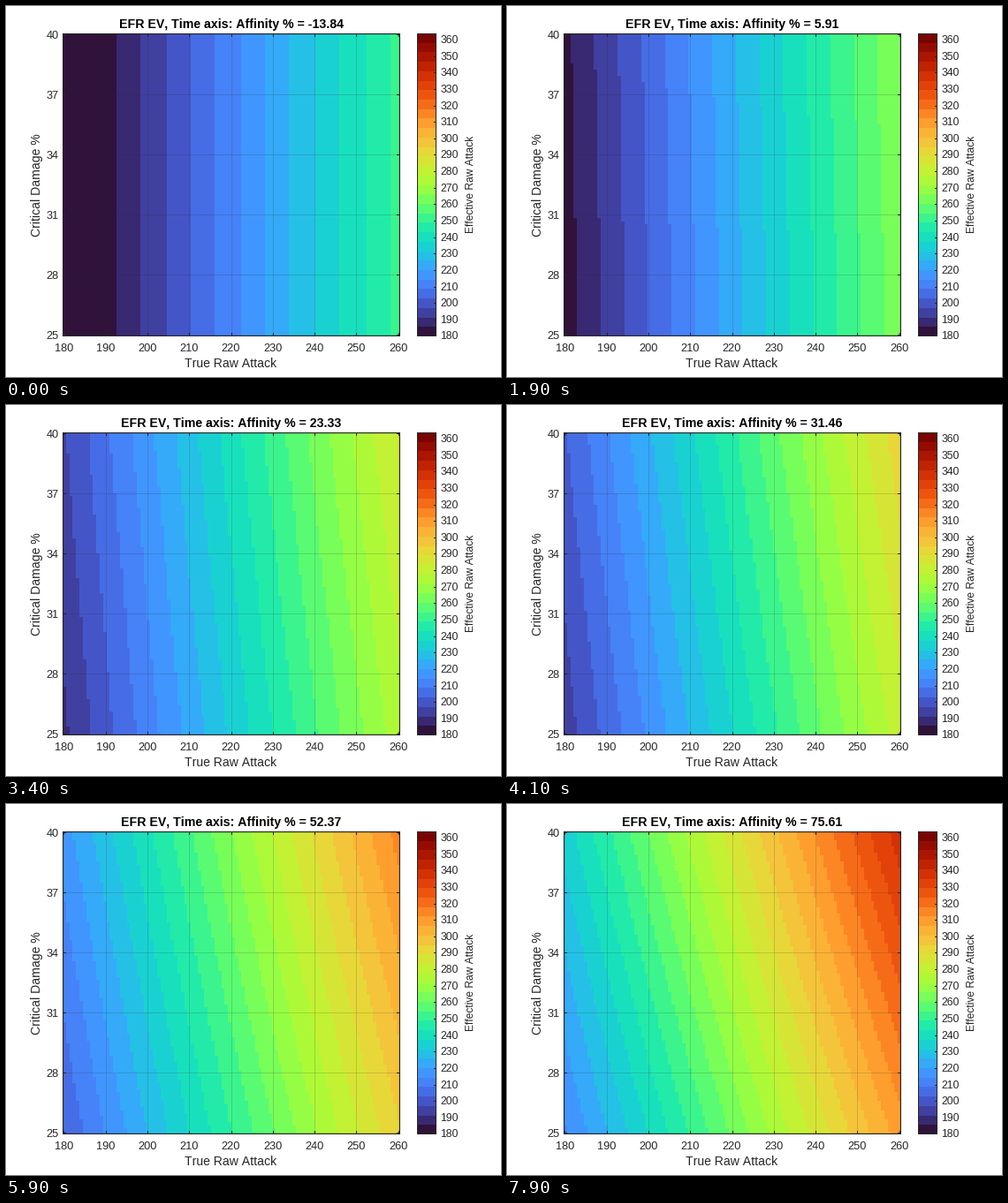
Animation, 560 px wide and 420 px high, one loop 8000 ms. Source, as a matplotlib script:

```python
import math

import numpy as np
import matplotlib.pyplot as plt
from matplotlib.animation import FuncAnimation
from matplotlib.patches import Rectangle

W, H, DPI = 560, 420, 100
PX = 72 / DPI  # points per pixel
LEFT, RIGHT, TOP, BOTTOM = 64, 446, 31, 374
BAR_LEFT, BAR_RIGHT = 465, 487
N = 100
LOW, HIGH, BANDS = 180, 364, 32
INK = (0.15, 0.15, 0.15)
GRID_ALPHA = 0.17

plt.rcParams["font.family"] = "Liberation Sans"
plt.rcParams["text.kerning_factor"] = 6  # effectively no kerning

raw = np.linspace(180, 260, N)
crit = np.linspace(25, 40, N)[:, None]
affinities = np.linspace(-15, 100, N)

fig = plt.figure(figsize=(W / 100, H / 100), dpi=DPI, facecolor="white")
ax = fig.add_axes([0, 0, 1, 1])
ax.axis("off")


def effective_raw(affinity):
    """Critical hits scale with crit damage; negative ones cost a flat 25 %."""
    bonus = crit if affinity >= 0 else np.full_like(crit, 25)
    return raw * (1 + affinity / 100 * bonus / 100)


def x_pixel(value):
    cell = (value - 180) / 80 * (N - 1)
    return LEFT + (cell + 0.5) / N * (RIGHT - LEFT)


def y_pixel(value):
    cell = (value - 25) / 15 * (N - 1)
    return BOTTOM - (cell + 0.5) / N * (BOTTOM - TOP)


def bar_pixel(value):
    return BOTTOM - (value - LOW) / (HIGH - LOW) * (BOTTOM - TOP)


def stroke(x, y, width, height, alpha=1):
    ax.add_patch(Rectangle((x, y), width, height, facecolor=INK, alpha=alpha,
                           linewidth=0, zorder=3))


def hline(x0, x1, y, alpha=1):
    stroke(x0, math.floor(y), x1 - x0, 1, alpha)


def vline(x, y0, y1, alpha=1):
    stroke(math.floor(x), y0, 1, y1 - y0, alpha)


def box(x0, x1):
    hline(x0, x1, TOP)
    hline(x0, x1, BOTTOM - 1)
    vline(x0, TOP, BOTTOM)
    vline(x1 - 1, TOP, BOTTOM)


def label(x, y, text, size, ha="center", color=INK, **kwargs):
    return ax.text(x, y, text, fontsize=size * PX, ha=ha, va="baseline",
                   color=color, rotation_mode="anchor", **kwargs)


def field(data, x0, x1):
    return ax.imshow(data, cmap=plt.get_cmap("turbo", BANDS), vmin=LOW, vmax=HIGH,
                     extent=(x0, x1, BOTTOM, TOP), origin="lower",
                     interpolation="nearest", aspect="auto", zorder=1)


heat = field(effective_raw(affinities[1]), LEFT, RIGHT)
band = (HIGH - LOW) / BANDS
field((LOW + band * (np.arange(BANDS) + 0.5))[:, None], BAR_LEFT, BAR_RIGHT)

for value in range(180, 261, 10):
    x = x_pixel(value)
    vline(x, TOP, BOTTOM, GRID_ALPHA)
    vline(x, TOP, TOP + 4)
    vline(x, BOTTOM - 4, BOTTOM)
    label(x - 0.5, 391, str(value), 12.8)

for value in range(25, 41, 3):
    y = y_pixel(value)
    hline(LEFT, RIGHT, y, GRID_ALPHA)
    hline(LEFT, LEFT + 4, y)
    hline(RIGHT - 4, RIGHT, y)
    label(60, math.floor(y) + 5, str(value), 12.8, "right")

for value in range(180, 361, 10):
    y = min(bar_pixel(value), BOTTOM - 1)
    hline(BAR_RIGHT - 3, BAR_RIGHT, y)
    label(491.5, math.floor(y) + 4, str(value), 12.3, "left")

box(LEFT, RIGHT)
box(BAR_LEFT, BAR_RIGHT)

label(254.5, 409, "True Raw Attack", 14)
label(39, 203, "Critical Damage %", 14, rotation=90)
label(529, 202, "Effective Raw Attack", 12, rotation=90)
title = label(255, 25, "", 14.1, color="black", weight="bold")

ax.set_xlim(0, W)
ax.set_ylim(H, 0)


def update(tick):
    # The first two steps are held for two ticks each.
    step = tick // 2 if tick < 4 else tick - 2
    affinity = affinities[step + 1]
    heat.set_data(effective_raw(affinity))
    title.set_text(f"EFR EV, Time axis: Affinity % = {affinity:.2f}")
    return heat, title


anim = FuncAnimation(fig, update, frames=80, interval=100, repeat=True,
                     repeat_delay=0, blit=False)
plt.show()
```
